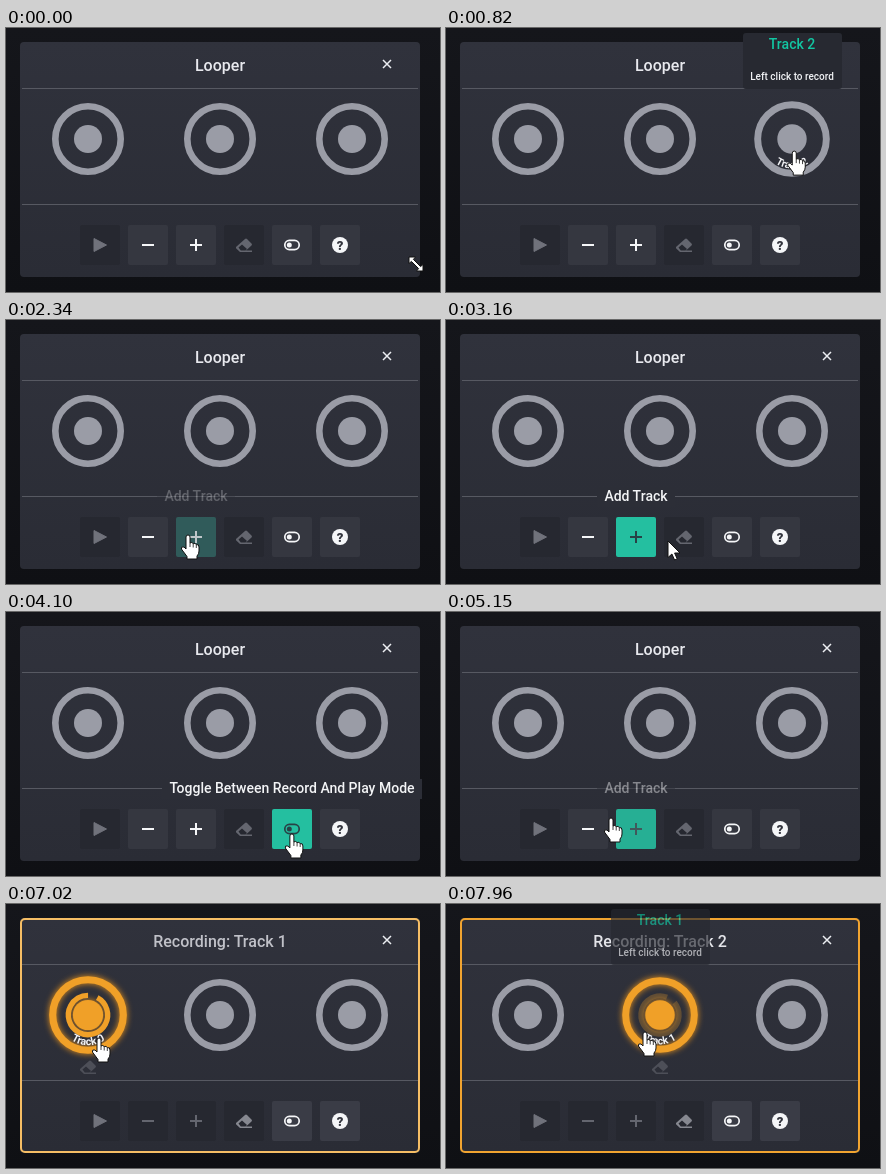
An HTML page for the animation above (8000 ms loop, 434 by 264 pixels).

```html
<!DOCTYPE html>
<html lang="en">
<head>
<meta charset="utf-8">
<title>Looper</title>
<style>
html, body { margin: 0; width: 100%; height: 100%; overflow: hidden; background: #111216; }
svg { display: block; width: 434px; height: 264px; font-family: Roboto, "Open Sans", sans-serif; font-weight: 500; }
text { text-anchor: middle; }
.glow { filter: drop-shadow(0 0 3px #e8931c); }
</style>
</head>
<body>
<svg id="stage" viewBox="0 0 434 264">
  <defs>
    <linearGradient id="back" x2="0" y2="1"><stop stop-color="#15161b"/><stop offset="1" stop-color="#0f1014"/></linearGradient>
    <linearGradient id="panel" x2="0" y2="1"><stop stop-color="#30323c"/><stop offset="1" stop-color="#2a2c35"/></linearGradient>
    <path id="labelArc" d="M-28 0A28 28 0 0 0 28 0"/>
  </defs>
  <rect width="434" height="264" fill="url(#back)"/>
  <rect x="14" y="14" width="400" height="235" rx="4" fill="url(#panel)"/>
  <path d="M16 60.5H412M16 176.5H412" stroke="#575962"/>
  <path d="M377 32l8 8m0-8l-8 8" stroke="#eceef2" stroke-width="1.5"/>
</svg>
<script>
const LOOP = 8000, STEP = 117;
const GREY = [154, 156, 166], ORANGE = [240, 160, 40], CREAM = [254, 234, 194];
const DARK = [38, 40, 48], BUTTON = [53, 55, 64], GREEN = [36, 191, 160], WHITE = [232, 233, 238];
const PULSE = 1700, SPIN = 1280;
const takes = [{ track: 0, from: 5690 }, { track: 1, from: 7830 }];

const stage = document.getElementById('stage');
function add(tag, attrs, parent = stage, text) {
  const node = document.createElementNS('http://www.w3.org/2000/svg', tag);
  set(node, attrs);
  if (text) node.textContent = text;
  return parent.appendChild(node);
}
function set(node, attrs) {
  for (const key in attrs) node.setAttribute(key, attrs[key]);
}
const clamp = v => Math.max(0, Math.min(1, v));
const mix = (a, b, k) => `rgb(${a.map((v, i) => Math.round(v + (b[i] - v) * k))})`;
// Rises after "from", falls after "to".
const fade = (t, from, to, len = 150) => clamp(Math.min((t - from) / len, 1 - (t - to) / len));
const strongest = (t, spans, shift = 0) => Math.max(0, ...spans.map(([a, b]) => fade(t, a, b + shift)));

const ERASER = 'M-8 2L1-6Q2-7 3-6L7.5-1.5Q8.5-.5 7.5.5L2 5.5H8V7H-4L-8 3.2ZM-5.5 2.6L-3.2 5.5H1.5L3 4L-2-.6Z';

const title = add('text', { x: 214, y: 43, 'font-size': 16 });

const tracks = [
  { x: 82, hover: [[1600, 2050], [5350, 7330]], tip: [[1640, 2050], [5380, 5680]] },
  { x: 214, hover: [[1330, 1560], [7440, 9000]], tip: [[1330, 1530], [7480, 7904]] },
  { x: 346, hover: [[640, 1240]], tip: [[660, 1230]] }
].map((track, i) => {
  const g = add('g', {});
  const ring = add('circle', { r: 32.7, fill: 'none', 'stroke-width': 6.6 }, g);
  const disc = add('circle', { r: 14 }, g);
  const arc = add('circle', { r: 18.2, fill: 'none', stroke: '#f0a028', 'stroke-width': 5, pathLength: 360, 'stroke-dasharray': '332 28' }, g);
  const label = add('text', { 'font-size': 10, 'font-weight': 700, fill: '#f1f2f5' }, g);
  add('textPath', { href: '#labelArc', startOffset: '50%' }, label, 'Track ' + i);
  const eraser = add('path', { d: ERASER, 'fill-rule': 'evenodd', fill: '#4d4f58', transform: `translate(${track.x} 163)` });
  return { ...track, g, ring, disc, arc, label, eraser };
});

const line = { fill: 'none', 'stroke-width': 2 };
const buttons = [
  { icon: g => add('path', { d: 'M-6-6.5L6.5 0L-6 6.5Z' }, g), off: 0 },
  { icon: g => add('path', { d: 'M-6 0H6', ...line }, g), off: 5690, tip: 'Remove Track', half: 52, hover: [[2640, 2860]] },
  { icon: g => add('path', { d: 'M-6 0H6M0-6V6', ...line }, g), off: 5690, tip: 'Add Track', half: 39, hover: [[2300, 2600], [2880, 3260], [4850, 5130]] },
  { icon: g => add('path', { d: ERASER, 'fill-rule': 'evenodd', 'stroke-width': 0 }, g), off: 0 },
  { icon: g => {
      add('rect', { x: -7.2, y: -4.6, width: 14.4, height: 9.2, rx: 4.6, ...line, 'stroke-width': 1.7 }, g);
      add('circle', { cx: -2.7, r: 2.5, 'stroke-width': 0 }, g);
    }, off: 9000, tip: 'Toggle Between Record And Play Mode', half: 130, hover: [[3420, 4300]] },
  { icon: g => {
      add('circle', { r: 8, 'stroke-width': 0 }, g);
      add('text', { y: 4.6, 'font-size': 13, 'font-weight': 800, style: 'fill:#30323b;stroke:none' }, g, '?');
    }, off: 9000 }
].map((button, i) => {
  const x = 94 + 48 * i;
  const g = add('g', { transform: `translate(${x} 217)` });
  const box = add('rect', { x: -20, y: -20, width: 40, height: 40, rx: 2 }, g);
  const mark = add('g', {}, g);
  button.icon(mark);
  let bubble;
  if (button.tip) {
    bubble = add('g', { transform: `translate(${x} 0)` });
    add('rect', { x: -button.half, y: 167, width: button.half * 2, height: 20, fill: '#2c2e37' }, bubble);
    add('text', { y: 181, 'font-size': 14, fill: '#f3f4f6' }, bubble, button.tip);
  }
  return { ...button, box, mark, bubble };
});

const border = add('rect', { x: 15, y: 15, width: 398, height: 233, rx: 4, fill: 'none', 'stroke-width': 2 });

tracks.forEach((track, i) => {
  const g = track.bubble = add('g', { transform: `translate(${track.x} 0)` });
  add('rect', { x: -49, y: 5, width: 99, height: 56, rx: 3, fill: '#272931' }, g);
  add('text', { y: 21, 'font-size': 14, fill: '#12c6a2' }, g, 'Track ' + i);
  add('text', { y: 52, 'font-size': 10, fill: '#f1f2f5' }, g, 'Left click to record');
});

const shape = { fill: '#fff', stroke: '#111', 'stroke-linejoin': 'round' };
const cursors = {
  arrow: add('path', { d: 'M0 0V16.5L3.9 13L6.6 19L9.2 17.9L6.6 12H12Z', ...shape }),
  resize: add('path', { d: 'M-7-7H-.5L-2.6-4.6L4.6 2.6L7 .5V7H.5L2.6 4.6L-4.6-2.6L-7-.5Z', ...shape }),
  hand: add('g', {})
};
add('path', { d: 'M-2 2Q-2 0 0 0T2 2V8Q4 6.6 5.2 8.6Q7.3 7.6 8.3 9.6Q11 9 11 12V16Q11 19 9 21V24H-1V21.5L-6.6 14Q-7 11-4 12L-2 14Z', ...shape }, cursors.hand);
add('path', { d: 'M2 8V12M5.2 8.6V12.5M8.3 9.6V13', fill: 'none', stroke: '#111', 'stroke-width': .8 }, cursors.hand);

const A = 'arrow', H = 'hand', R = 'resize';
const path = [
  [0, 410, 236, R], [120, 410, 236, R], [230, 400, 215, A], [690, 352, 125, H], [1170, 338, 118, H],
  [1285, 296, 118, A], [1400, 235, 120, H], [1521, 182, 125, H], [1638, 118, 120, H], [1870, 90, 122, H],
  [2050, 112, 160, A], [2340, 182, 215, H], [2600, 178, 218, H], [2700, 152, 218, H], [2850, 150, 218, H],
  [2950, 178, 218, H], [3040, 190, 220, H], [3159, 222, 221, A], [3276, 240, 222, A], [3420, 270, 220, H],
  [4100, 286, 222, H], [4300, 292, 226, H], [4440, 305, 241, A], [4680, 305, 241, A], [4797, 270, 250, A],
  [4914, 205, 228, H], [5148, 165, 206, H], [5265, 125, 165, A], [5380, 95, 138, H], [5600, 93, 134, H],
  [7250, 93, 134, H], [7400, 135, 128, A], [7480, 182, 126, H], [7700, 205, 129, H], [7956, 199, 128, H]
];

function moveCursor(t) {
  let i = path.length - 1;
  while (path[i][0] > t) i--;
  const [t0, x0, y0, kind] = path[i];
  const [t1, x1, y1] = path[i + 1] || [LOOP, x0, y0];
  const k = (t - t0) / (t1 - t0);
  const at = `translate(${x0 + (x1 - x0) * k} ${y0 + (y1 - y0) * k})`;
  for (const name in cursors) {
    set(cursors[name], { transform: at, display: name === kind ? 'inline' : 'none' });
  }
}

function render(t) {
  const take = takes.filter(item => t >= item.from).pop();
  const age = take ? t - take.from : 0;
  const phase = 2 * Math.PI * age / PULSE;
  const pulse = (1 - Math.cos(phase)) / 2;

  title.textContent = take ? `Recording: Track ${take.track + 1}` : 'Looper';
  set(title, { fill: mix(WHITE, [132, 134, 143], pulse) });
  set(border, { stroke: mix(ORANGE, CREAM, pulse), opacity: take ? 1 : 0 });

  tracks.forEach((track, i) => {
    const live = take && take.track === i;
    const hover = strongest(t, track.hover);
    const swell = live ? .03 * Math.max(0, -Math.sin(phase)) : 0;
    const color = mix(live ? ORANGE : GREY, WHITE, 0);
    set(track.g, { transform: `translate(${track.x} 111) scale(${1 + .05 * hover + swell})` });
    set(track.ring, { stroke: color, class: live ? 'glow' : '' });
    set(track.disc, { fill: color, class: live ? 'glow' : '' });
    set(track.arc, { opacity: live ? clamp(age / 500) : 0, transform: `rotate(${age / SPIN * 360 - 76})` });
    set(track.label, { opacity: hover });
    set(track.eraser, { opacity: live ? 1 : 0 });
    set(track.bubble, { opacity: strongest(t, track.tip) });
  });

  buttons.forEach((button, i) => {
    const off = t >= button.off;
    const hover = button.hover ? strongest(t, button.hover) : 0;
    const base = off ? DARK : take ? [58, 60, 70] : BUTTON;
    const dim = i === 3 && take ? [134, 136, 144] : i === 0 ? [112, 114, 123] : [100, 102, 111];
    const ink = mix(off ? dim : [245, 246, 248], [40, 66, 70], off ? 0 : hover);
    set(button.box, { fill: mix(base, GREEN, off ? 0 : hover) });
    set(button.mark, { fill: ink, stroke: ink });
    if (button.bubble) set(button.bubble, { opacity: strongest(t, button.hover, -65) });
  });

  moveCursor(t);
}

const start = performance.now();
function tick() {
  const t = (performance.now() - start) % LOOP;
  render(Math.floor((t + 10) / STEP) * STEP);
  requestAnimationFrame(tick);
}
tick();
</script>
</body>
</html>
```
